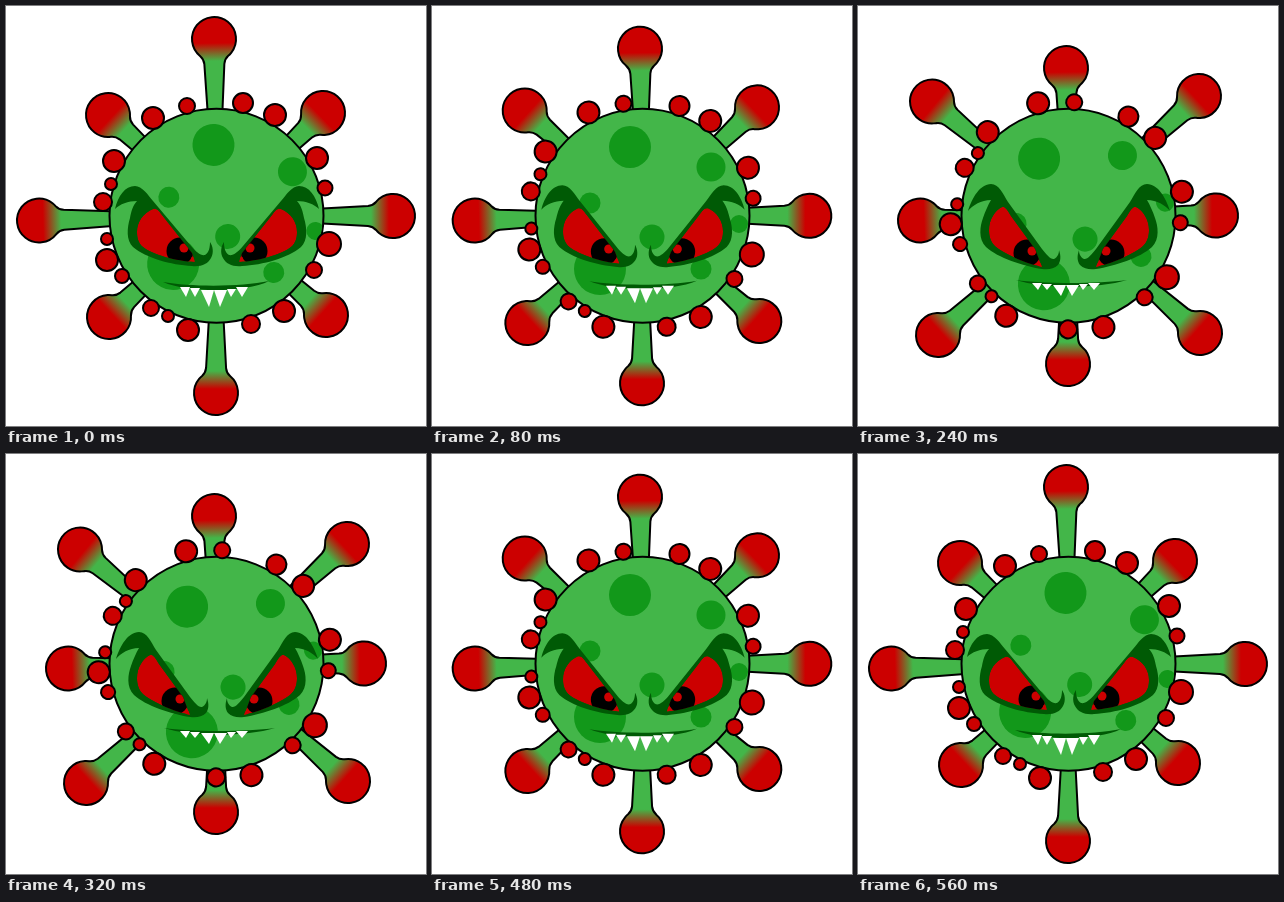
These frames come from a looping animation (420 px wide and 420 px high, 0.64 s). An HTML page with a canvas:

```html
<!DOCTYPE html>
<html lang="en">
<head>
<meta charset="utf-8">
<title>Angry virus</title>
<style>
html, body { margin: 0; width: 100%; height: 100%; overflow: hidden; background: #fff; }
canvas { display: block; width: 420px; height: 420px; }
</style>
</head>
<body>
<canvas id="stage" width="420" height="420"></canvas>
<script>
const ctx = document.getElementById('stage').getContext('2d');
const GREEN = '#43b649', SPOT = '#12981a', DARK = '#005a05', RED = '#cc0000';
const CENTER = [210.5, 209.8];
const STEP = 80, STEPS = 8, LAST = 3;

// Ball centre at rest, then fully moved
const spikes = [
  [208, 33, 208, 62], [317, 107, 341, 90], [387, 210, 358, 209.5], [320, 309, 342, 327],
  [210, 387, 210, 358], [103, 311, 80, 329], [33, 214.5, 62, 214.5], [102, 109, 74, 95.5]
];

// x, y, radius
const buds = [
  [147, 112, 11], [181, 100, 8], [237, 97, 10], [269, 109, 11], [311, 152, 11],
  [319, 182, 7.5], [323, 238, 12], [308, 264, 8], [278, 305, 11], [245, 318, 9],
  [182, 324, 11], [162, 310, 6], [145, 302, 8], [116, 270, 7], [101, 254, 11],
  [101, 233, 6], [97, 196, 9], [105, 178, 6], [108, 155, 11]
];
const spots = [
  [198, 141, 21], [279, 161, 14.5], [158, 197, 10.5], [220, 231, 12.5],
  [269, 263, 10.5], [168, 263, 26], [307, 218, 9]
];

// Degrees of turn at each pose
const budTurn = [0, 5.4, 11.2, 17.9];
const spotTurn = [4.9, 0, -7.5, -16];

const lidShape = [
  'M109,203 C112,190 119,180 129,180 C136,180 142,189 147,195 L185,240 C190,246 195,250 199,249 C203,247 204,241 204,236 C207,240 208,247 205,252 C202,258 195,261 186,260 C165,259 140,252 127,241 C120,234 121,222 124,212 C125,206 127,199 131,195 C122,195 114,198 109,203 Z',
  'M110,205 C114,192 122,178 133,178 C141,178 145,188 150,196 L184,243 C188,248 193,254 196,253 C200,251 201,247 201,244 C203,250 203,255 200,259 C196,263 190,264 184,263 C165,260 140,252 128,241 C120,233 122,220 125,212 C127,206 130,199 133,194 C123,194 115,199 110,205 Z'
];
const eyeShape = [
  'M131,226 C131,216 137,207 147,203 C151,202 153,205 156,209 L186,247 L189,256 C170,255 147,249 137,241 C132,237 131,231 131,226 Z',
  'M131,224 C131,214 137,204 144,201 C147,200 150,205 153,210 L177,243 L184,261 C170,258 148,249 138,241 C132,236 131,229 131,224 Z'
];
const mouthShape = [
  'M157,276 C185,281 235,281 263,275 C240,287 182,287 157,276 Z',
  'M158,274 C185,278 240,278 269,274 C240,283 185,283 158,274 Z'
];

// left, right, tip x; top y and tip y at rest, then fully moved
const teeth = [
  [174, 184, 180, 281, 291, 277, 284], [184, 194, 189, 282, 291, 278, 284],
  [195, 208, 203, 284, 301, 279, 290], [208, 221, 214, 284, 301, 279, 290],
  [221, 230, 225, 283, 291, 278, 284], [230, 242, 236, 281, 291, 277, 284]
];

const lerp = (a, b, u) => a + (b - a) * u;

function morph([from, to], u) {
  const ends = to.match(/\d+/g);
  let i = 0;
  return new Path2D(from.replace(/\d+/g, n => lerp(+n, +ends[i++], u)));
}

function disc(x, y, r, fill, outlined) {
  ctx.beginPath();
  ctx.arc(x, y, r, 0, Math.PI * 2);
  ctx.fillStyle = fill;
  ctx.fill();
  if (outlined) ctx.stroke();
}

function turnAbout(x, y, degrees) {
  ctx.translate(x, y);
  ctx.rotate(degrees * Math.PI / 180);
  ctx.translate(-x, -y);
}

function drawSpike([x0, y0, x1, y1], u) {
  const x = lerp(x0, x1, u), y = lerp(y0, y1, u);
  ctx.save();
  ctx.translate(x, y);
  ctx.rotate(Math.atan2(CENTER[1] - y, CENTER[0] - x));
  const fade = ctx.createLinearGradient(4, 0, 22, 0);
  fade.addColorStop(0, RED);
  fade.addColorStop(1, GREEN);
  ctx.beginPath();
  ctx.moveTo(80, 7);
  ctx.lineTo(25, 10);
  ctx.quadraticCurveTo(20, 10.5, 17, 14);
  ctx.arc(0, 0, 22, 0.69, -0.69);
  ctx.quadraticCurveTo(20, -10.5, 25, -10);
  ctx.lineTo(80, -7);
  ctx.fillStyle = fade;
  ctx.fill();
  ctx.stroke();
  ctx.restore();
}

function drawSpots(pose) {
  ctx.save();
  ctx.beginPath();
  ctx.arc(...CENTER, 106, 0, Math.PI * 2);
  ctx.clip();
  if (pose === 0) ctx.translate(3.7, 0.5);
  turnAbout(231, 207, spotTurn[pose]);
  for (const [x, y, r] of spots) disc(x, y, r, SPOT);
  ctx.restore();
}

function drawEye(u) {
  const eye = morph(eyeShape, u);
  ctx.fillStyle = DARK;
  ctx.fill(morph(lidShape, u));
  ctx.save();
  ctx.clip(eye);
  ctx.fillStyle = RED;
  ctx.fill(eye);
  disc(lerp(174, 169, u), lerp(245, 247, u), 13.5, '#000');
  disc(lerp(178, 174, u), lerp(242, 245, u), 4.5, RED);
  disc(lerp(187, 182, u), lerp(253, 259, u), 2.2, RED);
  ctx.restore();
}

function drawMouth(u) {
  ctx.fillStyle = DARK;
  ctx.fill(morph(mouthShape, u));
  ctx.fillStyle = '#fff';
  for (const [left, right, tip, top0, tip0, top1, tip1] of teeth) {
    const top = lerp(top0, top1, u);
    ctx.beginPath();
    ctx.moveTo(left, top);
    ctx.lineTo(right, top);
    ctx.lineTo(tip, lerp(tip0, tip1, u));
    ctx.fill();
  }
}

function draw(time) {
  const step = Math.floor(time / STEP) % STEPS;
  const pose = Math.min(step, STEPS - 1 - step);
  const u = pose / LAST;

  ctx.fillStyle = '#fff';
  ctx.fillRect(0, 0, 420, 420);
  ctx.strokeStyle = '#000';
  ctx.lineWidth = 2;

  for (const spike of spikes) drawSpike(spike, u);
  disc(...CENTER, 107, GREEN, true);
  drawSpots(pose);

  ctx.save();
  turnAbout(...CENTER, budTurn[pose]);
  for (const [x, y, r] of buds) disc(x, y, r, RED, true);
  ctx.restore();

  drawEye(u);
  ctx.save();
  ctx.translate(422, 0);
  ctx.scale(-1, 1);
  drawEye(u);
  ctx.restore();
  drawMouth(u);
}

function tick() {
  draw(performance.now());
  requestAnimationFrame(tick);
}
tick();
</script>
</body>
</html>
```
